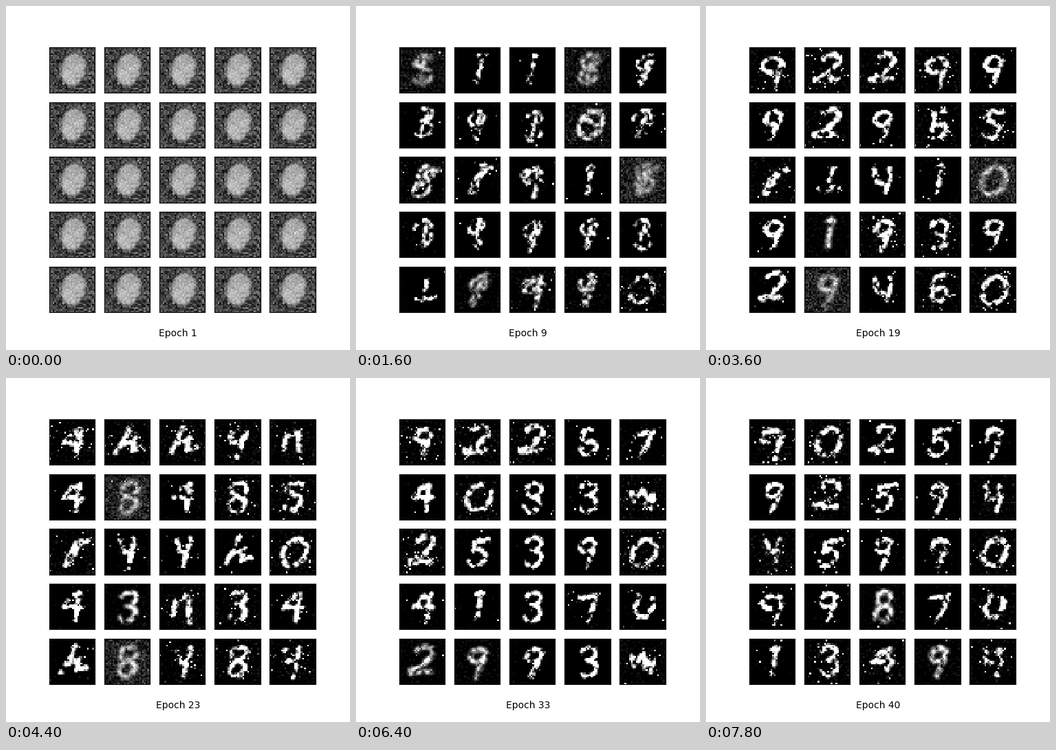
Recreate the animation shown at these times as a matplotlib script. Size 500x500 px, loop 8000 ms.

```python
import numpy as np
import matplotlib.pyplot as plt
from matplotlib.animation import FuncAnimation

EPOCHS = 40
N = 28
ROWS, COLS = np.mgrid[0:N, 0:N]


def path(*pts):
    """Evenly dotted polyline through the given points."""
    pts = np.array(pts, float)
    parts = [np.linspace(a, b, 12) for a, b in zip(pts[:-1], pts[1:])]
    return np.concatenate(parts)


def arc(cx, cy, rx, ry, start=0, end=360, slant=0.2):
    """Elliptic arc leaning to the right, angles clockwise in degrees."""
    a = np.radians(np.linspace(start, end, 40))
    y = cy + ry * np.sin(a)
    return np.column_stack([cx + rx * np.cos(a) + slant * (cy - y), y])


def glyph(*strokes):
    return np.concatenate(strokes)


GLYPHS = {
    "o": glyph(*[arc(14, 13.5, r, 1.4 * r, slant=0.12)
                 for r in np.arange(0.5, 6.1, 0.9)]),
    "i": glyph(path((16, 8), (12.5, 21)), path((15, 11), (12, 21)),
               path((16, 5), (17.5, 5))),
    "l": path((16, 8), (14.5, 14), (12.5, 20)),
    "0": arc(14.5, 14, 7, 8),
    "1": glyph(path((16, 5), (13.5, 22)), path((13, 6), (17, 5.5))),
    "2": glyph(arc(15, 8, 5, 4, 200, 400), path((18, 11), (13, 16), (6, 19)),
               path((6, 20), (19, 19))),
    "3": glyph(arc(14, 9, 4.5, 4, 200, 450), arc(14, 18, 4.5, 4.5, 270, 510)),
    "4": glyph(path((13, 8), (8, 14), (19, 14)), path((18, 6), (15.5, 22)),
               path((13, 8), (18, 7))),
    "5": glyph(path((21, 6), (12, 7), (11, 13)), arc(13, 17, 5, 5, 250, 510)),
    "6": glyph(path((17, 5), (11, 7), (10, 17)), arc(14, 17, 4.5, 4)),
    "7": path((9, 9), (20, 7), (13, 23)),
    "8": glyph(arc(14.5, 9, 4.5, 4), arc(13.5, 18, 4.5, 4.5)),
    "9": glyph(arc(14, 10, 4.5, 4), path((19, 8), (16, 16), (13, 23))),
    "c": arc(13, 13.5, 6, 8, 200, 450),
    "h": glyph(path((15, 4), (11, 13), (6, 20)),
               path((11, 15), (18, 12), (16, 19), (22, 17))),
    "j": glyph(path((17, 7), (15, 14)), path((9, 19), (13, 20), (20, 18))),
    "n": path((8, 18), (10, 10), (17, 8), (18, 23)),
    "q": glyph(arc(13.5, 11, 6, 4, 90, 360), path((19, 10), (15, 24))),
    "r": glyph(path((9, 22), (12, 14), (16, 8), (22, 7)),
               path((10, 22), (14, 15), (18, 9))),
    "s": path((20, 6), (13, 6), (10, 10), (18, 14), (18, 19), (14, 22), (9, 20)),
    "u": glyph(path((9, 8), (10, 15), (14, 16)),
               path((18, 7), (18, 14), (16, 22))),
    "w": path((7, 10), (9, 16), (14, 9), (16, 18), (20, 12), (19, 20)),
    "x": glyph(path((10, 7), (12, 14), (16, 14)), path((18, 6), (14, 23))),
    "y": path((12, 7), (9, 15), (11, 20), (16, 20), (20, 14), (20, 9)),
}

# gain, threshold, roughness, background level, background spread, speck cutoff
STYLES = np.array([
    (3.0, 0.42, 0.30, -0.15, 0.06, 3.3),  # clean
    (2.6, 0.40, 0.40, -0.10, 0.06, 2.6),  # few specks
    (2.0, 0.32, 0.45, -0.06, 0.08, 2.2),  # many specks
    (0.90, 0.08, 0.40, -0.04, 0.06, 3.2),  # soft
    (0.55, 0.00, 0.35, 0.13, 0.11, 3.2),  # grey noise
    (0.44, 0.00, 0.06, 0.26, 0.11, 3.6),  # untrained
])

# epoch: (shape of each cell, style of each cell), row by row
KEYS = {
    1: ("ooooo ooooo ooooo ooooo ooooo", "55555 55555 55555 55555 55555"),
    5: ("iiiii lii0i 8iqi6 liiii liqi0", "30030 00040 30004 00000 03332"),
    13: ("s1189 393sc rr41r c9993 j9490", "41141 11121 22214 21111 13222"),
    19: ("q22q9 9296s rju10 91939 29u60", "22221 12122 21114 13221 14122"),
    23: ("4hh9n 4848s rxxh0 43n34 h8x8x", "22222 14122 21112 13221 14222"),
    33: ("92267 4083w 25390 4137y 2993w", "22211 12112 21002 11011 33102"),
    40: ("q0259 9259u x5990 q987y 1349u", "22111 02112 21112 11312 12232"),
}
TIMES = list(KEYS)
SHAPES = [KEYS[t][0].replace(" ", "") for t in TIMES]
LEVELS = [KEYS[t][1].replace(" ", "") for t in TIMES]


def field(pts, shift, lean, size=1.85):
    """Soft stroke intensity on the pixel grid."""
    x = pts[:, 0] + shift[0] + lean * (14 - pts[:, 1])
    y = pts[:, 1] + shift[1]
    d2 = (COLS[..., None] - x) ** 2 + (ROWS[..., None] - y) ** 2
    return np.exp(-d2.min(axis=2) / size ** 2)


def patchy(noise):
    """Noise with clumps a few pixels wide, same variance."""
    steps = [(a, b) for a in (-1, 0, 1) for b in (-1, 0, 1)]
    coarse = sum(np.roll(noise, s, axis=(0, 1)) for s in steps) / 3
    return 0.8 * coarse + 0.5 * noise


def sample(epoch, cell, common):
    """Generated picture of one cell after the given epoch."""
    rng = np.random.default_rng([epoch, cell])
    k = min(np.searchsorted(TIMES, epoch, side="right") - 1, len(TIMES) - 2)
    u = (epoch - TIMES[k]) / (TIMES[k + 1] - TIMES[k])
    u = u * u * (3 - 2 * u)

    wobble = (1 - 1 / epoch) * (0.3 + 3 * u * (1 - u))
    shift = rng.normal(0, 0.8 * wobble, 2)
    lean = rng.normal(0, 0.1 * wobble)
    f = np.zeros((N, N))
    for j, weight in ((k, np.cos(u * np.pi / 2)), (k + 1, np.sin(u * np.pi / 2))):
        if weight > 0.01:
            f = np.maximum(f, weight * field(GLYPHS[SHAPES[j][cell]], shift, lean))

    a, b = STYLES[int(LEVELS[k][cell])], STYLES[int(LEVELS[k + 1][cell])]
    gain, cut, rough, level, spread, speck = a + (b - a) * u

    share = 0.6 + 0.38 / epoch
    own = rng.normal(size=common.shape)
    grain, dust, dots = share * common + np.sqrt(1 - share ** 2) * own

    v = gain * np.maximum(f * (1 + rough * patchy(grain)) - cut, 0)
    v += np.maximum(level + spread * (1 - 0.5 * f) * dust, 0)
    v += np.clip((dots + 0.6 * f ** 0.12 - speck) * 3, 0, 1)
    return np.clip(v, 0, 1)


fig, axes = plt.subplots(5, 5, figsize=(5, 5), dpi=100)
images = []
for ax in axes.flat:
    ax.set_xticks([])
    ax.set_yticks([])
    images.append(ax.imshow(np.zeros((N, N)), cmap="gray", vmin=0, vmax=1,
                            interpolation="nearest"))
label = fig.text(0.5, 0.04, "", ha="center", fontsize=10, family="DejaVu Sans")


def update(i):
    epoch = i + 1
    common = np.random.default_rng(epoch).normal(size=(3, N, N))
    for cell, im in enumerate(images):
        im.set_data(sample(epoch, cell, common))
    label.set_text(f"Epoch {epoch}")
    return images + [label]


anim = FuncAnimation(fig, update, frames=EPOCHS, interval=200,
                     repeat=True, repeat_delay=0, blit=False)
plt.show()
```
